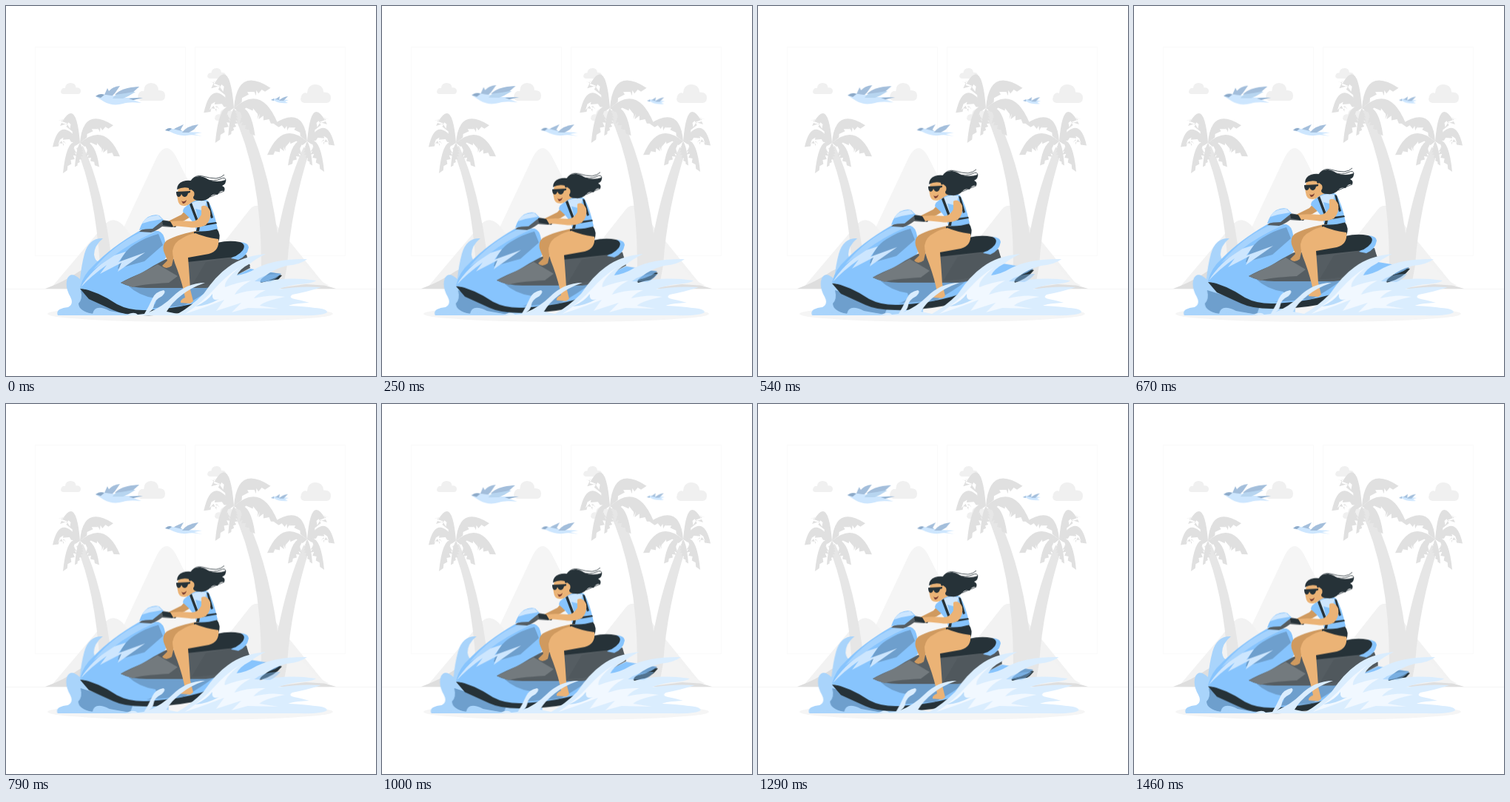
Animation, 500 px wide and 500 px high, one loop 1500 ms. Source, as an HTML page:

```html
<!DOCTYPE html>
<html lang="en">
<head>
<meta charset="utf-8">
<title>Jet ski</title>
<style>
  html, body { margin: 0; width: 100%; height: 100%; overflow: hidden; background: #fff; }
  svg { display: block; width: 100%; height: 100%; }
  .float { animation: float 1.5s linear infinite; }
  .shake { animation: shake 1.5s ease infinite; }
  .wind { animation: wind 1.5s linear infinite; transform-box: fill-box; transform-origin: center; }
  @keyframes float { 50% { transform: translateY(-10px); } }
  @keyframes shake {
    0%, 100% { transform: translateX(0); }
    10%, 90% { transform: translateX(-1px); }
    20%, 80% { transform: translateX(2px); }
    30%, 50%, 70% { transform: translateX(-4px); }
    40%, 60% { transform: translateX(4px); }
  }
  @keyframes wind {
    0%, 100% { transform: rotate(0); }
    25% { transform: rotate(1deg); }
    75% { transform: rotate(-1deg); }
  }
  .blue { fill: #87c4fd; }
  .deep { fill: #6e9fcd; }
  .pale { fill: #cde6fe; }
  .dark { fill: #263238; }
  .grey { fill: #555d62; }
  .skin { fill: #ebb376; }
  .shade { fill: #d09a5f; }
  .foam { fill: #daedfe; }
  .spray { fill: #f1f8ff; }
  .wave { fill: #a9d4fb; }
  .leaf { fill: #e0e0e0; }
  .trunk { fill: #e6e6e6; }
  .wing { fill: #a3bedb; }
</style>
</head>
<body>
<svg viewBox="0 0 500 500">
  <g fill="none" stroke="#fafafa">
    <rect x="39.500" y="55.500" width="203" height="282"/>
    <rect x="255.500" y="55.500" width="203" height="282"/>
  </g>
  <g id="clouds" fill="#f0f0f0"></g>

  <!-- hills and floor -->
  <path fill="#f5f5f5" d="M120 382L204 204Q217 180 230 204L320 382Z"/>
  <path fill="#f2f2f2" d="M60 382L132 297Q144 282 158 296L225 382Z"/>
  <path fill="#f2f2f2" d="M245 382L327 278Q338 262 350 277L435 382Z"/>
  <path fill="#dedede" d="M53 382Q78 373 100 358L130 345V382ZM446 382Q418 374 398 366L365 382Z"/>
  <path fill="#f3f3f3" d="M360 382L381 341Q398 342 409 356Q420 370 437 378L405 376Z"/>
  <path stroke="#f0f0f0" stroke-width=".7" d="M0 382.500H500"/>

  <g class="trunk">
    <path d="M95 192L104 189Q131 245 143 345L127 350Q120 250 95 192Z"/>
    <path d="M306 143L317 138Q353 205 367 308Q380 240 402 191L411 193Q385 275 380 350L376 372H345V350Q345 225 306 143Z"/>
  </g>
  <g id="palms" class="leaf"></g>

  <!-- birds -->
  <g class="wind">
    <path class="wing" d="M133 120L137 111L139 115Q144 109 154 108L147 118L143 122Z"/>
    <path class="pale" d="M121 122Q127 117 134 120Q147 121 159 124L185 124L172 127L183 131Q166 129 158 132Q144 136 132 129Z"/>
    <path fill="#b7d5f0" d="M144 125Q152 112 180 109L172 116L175 116L165 122L158 125Z"/>
    <path class="wing" d="M147 120Q156 110 180 109L172 116L161 118Z"/>
    <path fill="#8ca9c8" d="M121 122Q127 117 133 120L128 124ZM166 125L185 124L172 127Z"/>

    <path class="wing" d="M225 168L229 165L240 160L236 167L239 170Z"/>
    <path class="pale" d="M215 168Q219 163 225 166L242 170L265 171L254 173L265 176Q252 173 244 175Q233 176 222 170Z"/>
    <path class="wing" d="M238 171Q244 162 260 160L254 167L247 171Z"/>
    <path fill="#8ca9c8" d="M215 168Q220 163 224 166L220 169Z"/>

    <path class="pale" d="M358 127L363 125L372 126L382 127L377 129L381 131Q369 132 363 128Z"/>
    <path class="wing" d="M364 126L370 122L369 127ZM369 128Q373 123 381 122L375 128ZM358 127L362 125L362 128Z"/>
  </g>

  <ellipse cx="249" cy="416" rx="193" ry="11" fill="#f5f5f5"/>

  <!-- water behind -->
  <g class="shake">
    <path class="wave" d="M70 418Q66 409 84 407Q92 403 87 393Q79 379 83 368Q88 358 100 369Q102 350 106 335Q112 313 131 314Q119 324 119 336Q121 350 132 343L220 380V418Z"/>
    <path class="deep" d="M101 384L172 406L168 417L140 412Q120 402 117 416Q98 412 98 402Q104 396 101 384Z"/>
  </g>

  <g class="float">
    <!-- hull -->
    <path class="dark" d="M100 382Q150 385 205 398L290 380Q320 361 345 358L373 364Q364 376 345 382L300 392Q278 404 254 412Q215 419 185 418Q160 418 145 411L112 396Z"/>
    <path class="blue" d="M100 381Q104 363 119 350Q142 326 180 304L206 304Q213 306 215 318L216 340Q207 355 195 362L285 375L330 355L372 362Q357 372 330 377L300 385Q270 399 250 403Q225 409 190 411Q167 412 150 403Q125 386 100 381Z"/>
    <path class="deep" d="M165 378L285 376Q262 394 240 405L190 409Q206 404 202 395Q180 392 165 378ZM336 371L349 359L372 362Q358 373 336 374Z"/>
    <path class="grey" d="M155 374Q168 381 190 381L270 381Q296 379 309 365L330 354L325 336L248 341L216 342Q200 350 183 361Q167 367 155 374Z"/>
    <path fill="#737a7e" d="M155 374Q179 363 205 349L232 365L220 374Q182 376 171 380Z"/>
    <path d="M251 378L270 346L324 337L330 351L309 365Q290 377 251 378Z" fill="#50585d"/>
    <path class="deep" d="M151 355Q156 333 174 322Q190 312 206 308L212 323L187 345Q169 350 151 355Z"/>
    <path class="pale" d="M101 380Q115 357 143 338L162 332L152 346L188 333L151 359L156 347L127 362L136 350Q116 364 101 380Z"/>
    <path fill="#a6d3fd" d="M118 356Q146 322 184 305L202 305Q168 320 145 338Z"/>

    <!-- seat -->
    <path class="blue" d="M304 341Q318 330 316 319Q328 320 328 326Q326 338 314 343Z"/>
    <path class="dark" d="M240 339L285 320Q302 316 316 319Q325 322 320 330Q312 340 300 340L245 346Z"/>

    <!-- windshield and bar -->
    <path class="grey" d="M180 305Q185 299 197 300L211 289L229 292L225 299L211 298Q203 304 196 306Z"/>
    <path class="blue" d="M180 303Q184 290 192 285Q200 281 207 283L213 289L198 301Q188 301 180 303Z"/>
    <path class="pale" d="M184 294Q189 283 206 283L211 288L194 291Z"/>

    <!-- far arm and leg -->
    <path class="shade" d="M246 272L237 282L219 291L224 297L241 290L256 281Z"/>
    <path class="shade" d="M263 303Q233 308 217 317Q211 322 213 331L218 344L211 351Q216 357 224 351L229 329L262 321Z"/>

    <!-- body -->
    <path class="skin" d="M247 258L250 270L262 268L257 253Z"/>
    <path class="dark" d="M254 305L285 301Q291 309 287 319Q268 318 254 309Z"/>
    <path class="skin" d="M256 307Q267 312 287 315Q289 331 274 335L246 340Q248 365 249 383L253 399L249 402L236 401Q235 397 242 394Q239 377 231 355Q225 341 225 331Q227 319 238 314Q245 309 256 307Z"/>
    <path class="blue" d="M250 266Q261 259 273 263Q281 276 286 301Q269 306 257 304Q256 292 239 278Q238 273 250 266Z"/>
    <path class="pale" d="M250 267Q260 261 271 264L268 277L256 274L260 290Q253 279 250 267Z"/>
    <path class="dark" d="M248 268L251 266L262 295L284 292L285 294L262 298L261 304L257 304L259 297Z"/>
    <path class="dark" d="M271 264L274 265L280 286L277 287Z"/>
    <path class="skin" d="M264 271Q271 267 276 277Q278 288 270 296Q260 301 247 299L227 297Q222 298 221 292Q227 289 251 291Q259 291 264 282Z"/>
    <path class="dark" d="M211 290L229 292Q232 295 229 299L212 296Z"/>
    <path class="skin" d="M222 291L231 291L233 297L226 298Z"/>

    <!-- head -->
    <path class="skin" d="M233 247Q246 239 253 250L253 260Q250 269 242 270Q233 271 232 261L231 255Z"/>
    <path class="dark" d="M231 248Q231 240 239 237Q245 235 250 236Q253 230 262 230Q269 231 274 235Q285 239 297 235Q298 240 292 243Q297 245 295 250Q289 249 286 255Q279 253 276 258Q270 264 262 263Q252 263 253 257Q255 250 250 248Q247 250 247 246Q239 244 231 248Z"/>
    <path fill="none" stroke="#263238" stroke-width=".8" d="M249 237Q256 227 266 230T284 233Q291 232 295 228M270 234Q281 238 289 234T297 236M276 258Q287 253 295 250"/>
    <ellipse class="skin" cx="252" cy="254" rx="2.500" ry="4"/>
    <path class="dark" d="M230 251L249 250V252L246 253Q245 258 241 258Q238 257 237 254Q236 258 233 258Q230 257 230 251Z"/>
    <path d="M237 263Q240 266 244 262Q243 267 239 267Z" fill="#7d3f32"/>
  </g>

  <!-- water in front -->
  <g class="shake">
    <path class="foam" d="M162 418Q173 412 178 417L187 416Q193 406 198 395Q202 386 213 384Q217 386 211 392Q201 397 200 404Q199 411 193 414Q212 406 225 393Q244 374 269 374Q249 381 237 391Q224 401 217 413L232 416Q250 406 267 389Q284 364 300 353Q319 338 351 335Q337 342 330 348Q316 355 312 364Q326 362 339 354Q365 341 407 342Q399 349 379 351Q361 356 350 365Q341 371 344 374Q378 365 419 371Q415 375 395 376Q376 379 368 383Q396 378 426 380Q408 386 387 390Q381 394 390 396Q401 398 410 401Q387 402 382 405Q404 406 417 408Q434 409 434 414Q428 419 395 418Z"/>
    <path class="wave" d="M70 418Q100 412 120 416Q145 411 170 418Z" opacity=".55"/>
    <path class="spray" d="M242 416Q267 399 281 383Q299 363 316 353Q294 371 296 380Q314 373 331 371Q314 380 309 390Q327 383 351 384Q339 389 335 395Q359 389 377 393Q348 399 343 405L368 409L327 408L305 414L318 401L284 412L295 397Q267 408 242 416Z"/>
    <path fill="#b9dcfb" d="M256 406Q272 399 279 389Q278 400 288 396Q272 405 256 406Z"/>
    <path class="blue" d="M336 372Q349 361 371 362Q366 369 357 373Z" opacity=".45"/>
  </g>
</svg>
<script>
  const add = (id, d) => {
    const p = document.createElementNS("http://www.w3.org/2000/svg", "path");
    p.setAttribute("d", d);
    document.getElementById(id).append(p);
  };

  // x, y: bottom left; w, h: size
  const cloud = (x, y, w, h) => add("clouds",
    `M${x + w * .12} ${y}q${-w * .16} ${-h * .05} ${-w * .1} ${-h * .35}` +
    `q${w * .06} ${-h * .25} ${w * .2} ${-h * .18}q${w * .02} ${-h * .47} ${w * .27} ${-h * .47}` +
    `q${w * .25} 0 ${w * .27} ${h * .42}q${w * .24} ${-h * .02} ${w * .24} ${h * .3}` +
    `q0 ${h * .28} ${-w * .15} ${h * .28}z`);
  [[74, 119, 27, 15], [178, 128, 37, 24], [272, 98, 25, 14], [398, 131, 41, 25], [282, 155, 32, 16]]
    .forEach(c => cloud(...c));

  // Curved frond: smooth upper edge, notched lower edge.
  const frond = (x, y, cx, cy, tx, ty, w) => {
    const at = (t, a, b, c) => (1 - t) ** 2 * a + 2 * t * (1 - t) * b + t * t * c;
    const side = tx < x ? -1 : 1, n = 16;
    let d = `M${x} ${y}Q${cx} ${cy} ${tx} ${ty}`;
    for (let i = n - 1; i > 0; i--) {
      const t = i / n, px = at(t, x, cx, tx), py = at(t, y, cy, ty);
      const ux = 2 * ((1 - t) * (cx - x) + t * (tx - cx));
      const uy = 2 * ((1 - t) * (cy - y) + t * (ty - cy));
      const len = Math.hypot(ux, uy);
      const k = w * Math.sin(Math.PI * (.08 + .86 * t)) * (i % 2 ? 1 : .68);
      d += `L${px - side * uy / len * k + ux / len * k * .3} ${py + side * ux / len * k + uy / len * k * .3}`;
    }
    add("palms", d + "Z");
  };

  // Control point and tip of each frond, relative to the crown.
  const shape = [
    [-27, -36, -37, 5, 20], [-18, -10, -23, 38, 14], [-5, -58, -25, -25, 21],
    [4, -46, 45, -22, 19], [34, -27, 54, 17, 20], [20, -8, 26, 30, 15], [-5, 6, -7, 30, 9]
  ];
  const palm = (x, y, sx, sy) => shape.forEach(([a, b, c, d, w]) =>
    frond(x, y, x + a * sx, y + b * sy, x + c * sx, y + d * sy, w * sy));
  palm(100, 185, 1, 1.08);
  palm(308, 138, 1.1, 1.24);
  palm(407, 183, -1, 1.08);
</script>
</body>
</html>
```
